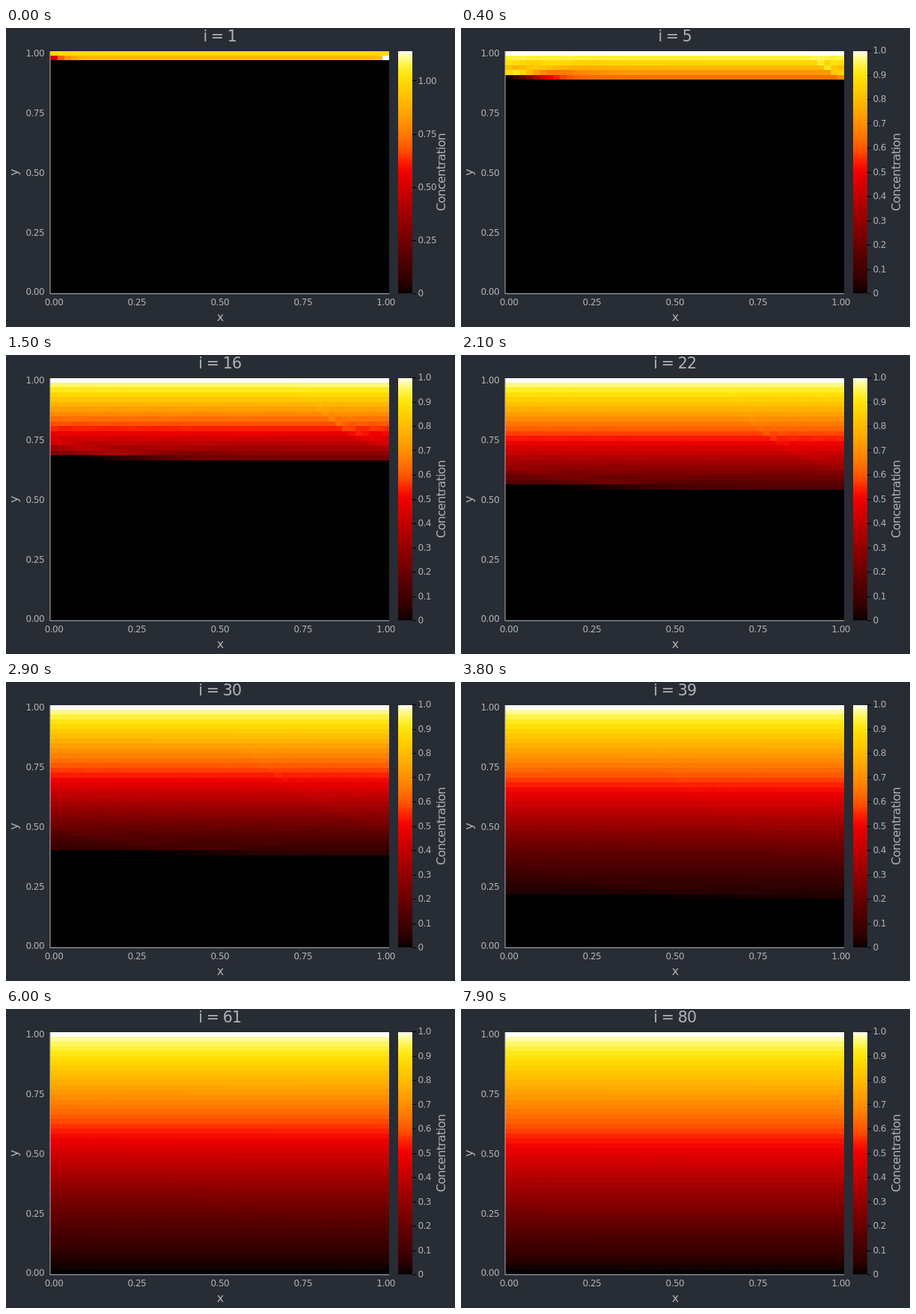
Animation of 600 by 400 pixels, one loop 8 s. Source, as an HTML page with a canvas:

```html
<!DOCTYPE html>
<html>
<head>
<meta charset="utf-8">
<title>Concentration</title>
<style>
html, body { margin: 0; width: 100%; height: 100%; overflow: hidden; background: #282c34; }
canvas { display: block; }
</style>
</head>
<body>
<canvas id="stage" width="600" height="400"></canvas>
<script>
const ctx = document.getElementById('stage').getContext('2d');
const N = 50, STEPS = 80, STEP_MS = 100, OMEGA = 1.91;
const plot = { x: 59, y: 30.5, w: 453, h: 324.8 };
const bar = { x: 524, w: 19, bottom: 355.5, h: 325 };
const FG = '#adb2b7';

// Over-relaxation sweep from the bottom row up, periodic in x; row 0 is the top.
function relax(c) {
  for (let y = N - 2; y > 0; y--) {
    for (let x = 0; x < N; x++) {
      const sum = c[y - 1][x] + c[y + 1][x] + c[y][(x + 1) % N] + c[y][(x + N - 1) % N];
      c[y][x] = (1 - OMEGA) * c[y][x] + OMEGA / 4 * sum;
    }
  }
}

const grid = Array.from({ length: N }, (_, y) => Array(N).fill(y ? 0 : 1));
const states = Array.from({ length: STEPS }, () => {
  relax(grid);
  return grid.map(row => row.slice());
});

const clamp = v => Math.min(1, Math.max(0, v));

// Black-red-yellow-white map with lightness linear in v.
function fire(v) {
  const srgb = u => {
    u = clamp(u);
    return 255 * (u <= 0.0031308 ? 12.92 * u : 1.055 * u ** (1 / 2.4) - 0.055);
  };
  const lum = v > 0.08 ? ((v * 100 + 16) / 116) ** 3 : v * 100 / 903.3;
  const blue = Math.max(0, (v - 0.87) / 0.13) ** 2.5;
  const green = (lum - 0.2126 - 0.0722 * blue ** 2.2) / 0.7152;
  return [srgb(lum / 0.2126), srgb(green), 255 * blue];
}

// A moving average rounds off the corners of the colour path.
const colors = Array.from({ length: 256 }, (_, k) => {
  const reach = Math.min(10, k, 255 - k);
  const sum = [0, 0, 0];
  for (let d = -reach; d <= reach; d++) {
    fire((k + d) / 255).forEach((part, n) => sum[n] += part);
  }
  return `rgb(${sum.map(s => Math.round(s / (2 * reach + 1)))})`;
});
const colorOf = v => colors[Math.round(255 * clamp(v))];

function rect(x, y, w, h, color) {
  ctx.fillStyle = color;
  ctx.fillRect(x, y, w, h);
}

function label(str, x, y, size, align = 'center', turned = false) {
  ctx.save();
  ctx.translate(x, y);
  if (turned) ctx.rotate(-Math.PI / 2);
  ctx.font = `${size}px "DejaVu Sans", sans-serif`;
  ctx.letterSpacing = `${-0.045 * size}px`;
  ctx.textAlign = align;
  ctx.fillStyle = FG;
  ctx.fillText(str, 0, 0);
  ctx.restore();
}

function drawField(c, lo, hi) {
  const edgeX = k => Math.ceil(plot.x + plot.w * k / N);
  const edgeY = k => Math.round(plot.y + plot.h * k / N);
  c.forEach((row, y) => row.forEach((v, x) => {
    rect(edgeX(x), edgeY(y), edgeX(x + 1) - edgeX(x), edgeY(y + 1) - edgeY(y),
      colorOf((v - lo) / (hi - lo)));
  }));
}

function drawAxes() {
  rect(58.5, 31, 1, 325, FG);
  rect(59, 355, 453, 1, FG);
  for (let k = 0; k < 5; k++) {
    const str = (k / 4).toFixed(2);
    label(str, 64 + 110.9 * k, 371, 12);
    label(str, 51, 357.2 - 79.7 * k, 12, 'right');
  }
  label('x', 286, 391.5, 16);
  label('y', 15.5, 193.5, 16, 'center', true);
}

function drawBar(lo, hi) {
  for (let y = 31; y < 355; y++) {
    rect(bar.x, y, bar.w, 1, colorOf((bar.bottom - y - 0.5) / bar.h));
  }
  const step = hi < 1.1 ? 0.1 : 0.25;
  const digits = step === 0.1 ? 1 : 2;
  for (let k = 0; k * step <= hi + 1e-9; k++) {
    const y = bar.bottom - bar.h * (k * step - lo) / (hi - lo);
    rect(543, Math.round(y - 0.5), 5, 1, '#000');
    label(k ? (k * step).toFixed(digits) : '0', 550.5, y + 3.8, 12, 'left');
  }
  label('Concentration', 587, 193, 16, 'center', true);
}

function draw() {
  const i = Math.floor(performance.now() % (STEPS * STEP_MS) / STEP_MS);
  const c = states[i];
  // The range follows the early overshoot, then stays at 0 to 1.
  const early = i < 9;
  const lo = early ? Math.min(...c.flat()) : 0;
  const hi = early ? Math.max(...c.flat()) : 1;
  rect(0, 0, 600, 400, '#282c34');
  rect(59, 30, 453, 326, '#21252b');
  drawField(c, lo, hi);
  drawAxes();
  drawBar(lo, hi);
  label(`i = ${i + 1}`, 285.7, 18, 20.6);
  requestAnimationFrame(draw);
}
draw();
</script>
</body>
</html>
```
